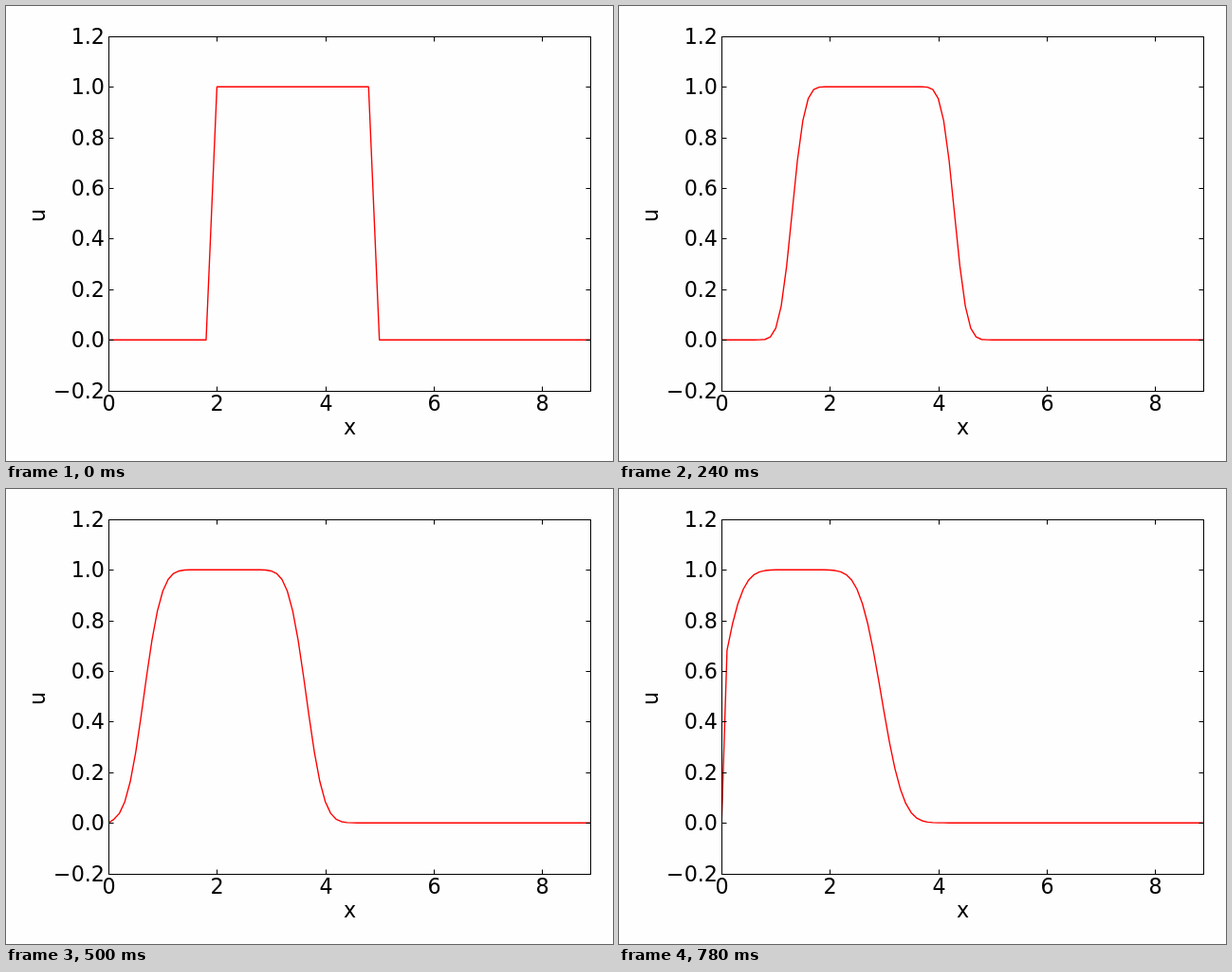
Write an HTML page with a canvas that moves like this. It is 640 px wide and 480 px high and loops after 800 ms.

```html
<!DOCTYPE html>
<html lang="en">
<head>
<meta charset="utf-8">
<title>Upwind advection</title>
<style>
html, body { margin: 0; width: 100%; height: 100%; overflow: hidden; background: #fefefe; }
canvas { display: block; }
</style>
</head>
<body>
<canvas id="stage" width="640" height="480"></canvas>
<script>
const ctx = document.getElementById("stage").getContext("2d");
const FRAME_MS = 20, FRAMES = 40;
const POINTS = 90, DX = 0.1, COURANT = 0.5;
const TICK = 5;

const px = x => 108.2 + x * 57.1;
const py = u => 352.2 - u * 267;
// Centre of the nearest pixel, so that thin axis lines stay crisp.
const snap = v => Math.round(v) + 0.5;

const LEFT = snap(px(0)), RIGHT = snap(px((POINTS - 1) * DX));
const TOP = snap(py(1.2)), BOTTOM = snap(py(-0.2));

// One upwind step of a left-moving wave, with u = 0 held at both ends.
const advance = u => u.map((v, i) =>
  i === 0 || i === POINTS - 1 ? 0 : v + COURANT * (u[i + 1] - v));

const profiles = [];
let wave = Array.from({ length: POINTS }, (_, i) => i >= 20 && i < 50 ? 1 : 0);
for (let n = 0; n < FRAMES; n++) {
  wave = advance(wave);
  profiles.push(wave);
}

function segment(x1, y1, x2, y2) {
  ctx.beginPath();
  ctx.moveTo(x1, y1);
  ctx.lineTo(x2, y2);
  ctx.stroke();
}

function drawAxes() {
  ctx.strokeStyle = ctx.fillStyle = "#000";
  ctx.lineWidth = 1;
  ctx.strokeRect(LEFT, TOP, RIGHT - LEFT, BOTTOM - TOP);
  ctx.font = '22.22px "DejaVu Sans", sans-serif';
  ctx.textBaseline = "alphabetic";

  ctx.textAlign = "center";
  for (let x = 0; x <= 8; x += 2) {
    const at = snap(px(x));
    segment(at, BOTTOM, at, BOTTOM - TICK);
    segment(at, TOP, at, TOP + TICK);
    ctx.fillText(x, at, 427);
  }
  ctx.fillText("x", 362.5, 452);

  ctx.textAlign = "right";
  for (let k = -1; k <= 6; k++) {
    const u = k / 5, at = snap(py(u));
    segment(LEFT, at, LEFT + TICK, at);
    segment(RIGHT, at, RIGHT - TICK, at);
    ctx.fillText(u.toFixed(1).replace("-", "\u2212"), 104, Math.round(py(u) + 8));
  }

  ctx.save();
  ctx.translate(41, 221);
  ctx.rotate(-Math.PI / 2);
  ctx.textAlign = "center";
  ctx.fillText("u", 0, 0);
  ctx.restore();
}

function drawCurve(u) {
  ctx.save();
  ctx.beginPath();
  ctx.rect(LEFT, TOP, RIGHT - LEFT, BOTTOM - TOP);
  ctx.clip();
  ctx.beginPath();
  u.forEach((v, i) => ctx.lineTo(px(i * DX), py(v)));
  ctx.strokeStyle = "#f00";
  ctx.lineWidth = 1.39;
  ctx.lineJoin = "round";
  ctx.stroke();
  ctx.restore();
}

function render() {
  const frame = Math.floor(performance.now() / FRAME_MS) % FRAMES;
  ctx.fillStyle = "#fefefe";
  ctx.fillRect(0, 0, 640, 480);
  drawCurve(profiles[frame]);
  drawAxes();
  requestAnimationFrame(render);
}
render();
</script>
</body>
</html>
```
